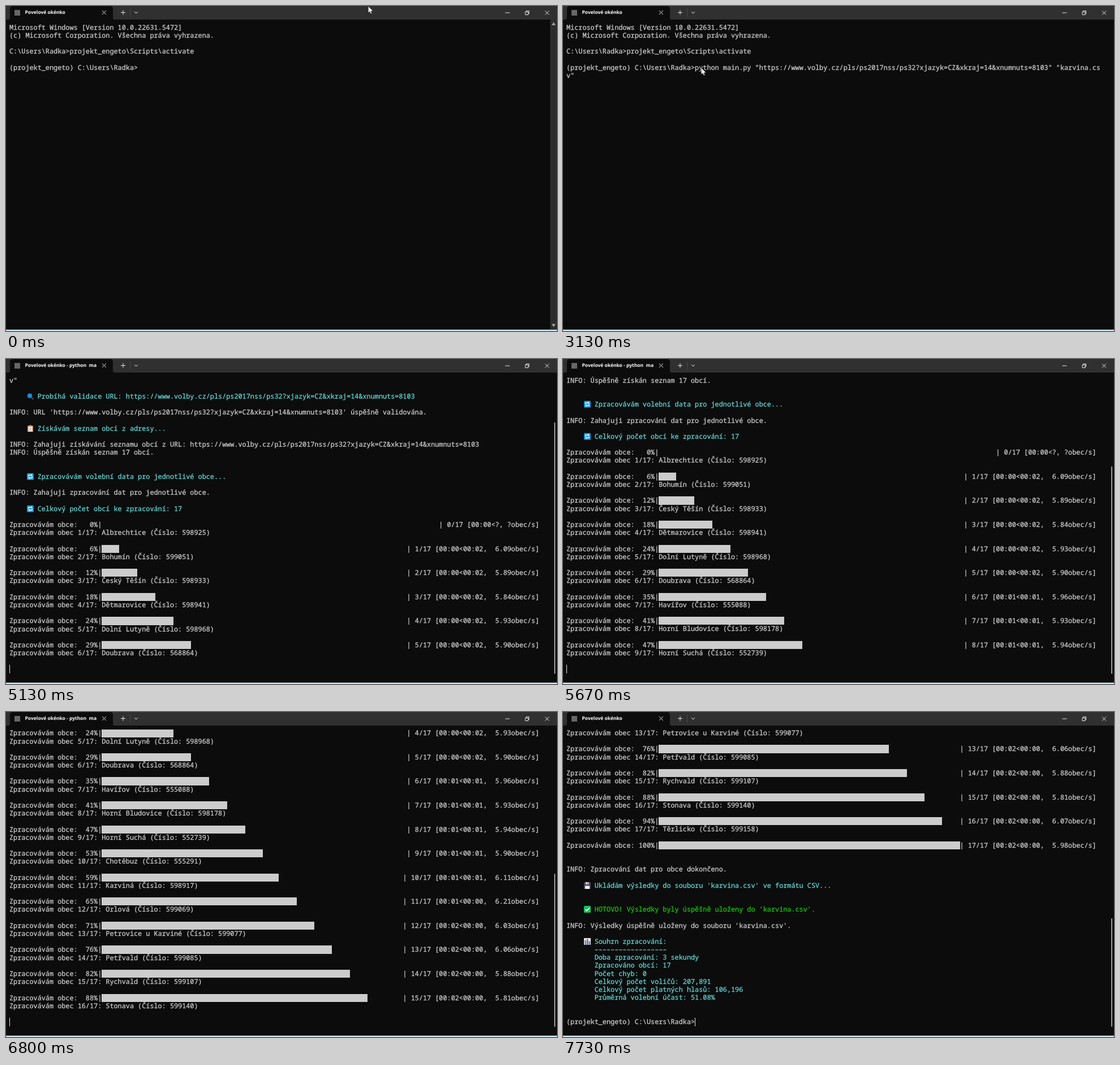
An HTML page that plays this animation: 974 by 575 pixels, repeating every 8000 ms.

```html
<!DOCTYPE html>
<html lang="cs">
<head>
<meta charset="utf-8">
<style>
html, body { margin: 0; width: 100%; height: 100%; overflow: hidden; background: #0c0c0c; }
#stage { position: relative; width: 974px; height: 575px; overflow: hidden; }
#stage > * { position: absolute; }
#chrome { left: 0; top: 0; }
#title { left: 33.5px; top: 4px; width: 126px; overflow: hidden; white-space: pre; color: #fff;
  font: 700 8.5px/16px "Open Sans", sans-serif; text-rendering: geometricPrecision; }
#view { left: 6px; top: 30.8px; width: 950px; height: 525.4px; overflow: hidden; }
#rows { position: absolute; left: 0; width: 100%; color: #ccc; white-space: pre;
  font: 11.8333px/14.2px "Noto Sans Mono", "DejaVu Sans Mono", monospace;
  -webkit-text-stroke: .3px; text-rendering: geometricPrecision; font-variant-ligatures: none; }
.row { position: relative; height: 14.2px; }
.row i { position: absolute; left: 163.3px; top: 0; height: 14.2px; background: #ccc; }
.row svg { position: absolute; left: 30.5px; top: 1px; }
.cyan { color: #61d6d6; }
.green { color: #16c60c; }
#caret { width: 1px; height: 14.2px; background: #e4e4e4; }
#thumb { left: 969px; width: 2px; border-radius: 1px; background: #9a9a9a; }
#mouse { left: 0; top: 0; overflow: visible; }
#edge { left: 0; top: 573px; width: 974px; height: 2px; background: #cde6ee; box-shadow: 0 -1px #56646a; }
</style>
</head>
<body>
<div id="stage">
  <svg id="chrome" width="974" height="575" fill="none" stroke="#e8e8e8">
    <g stroke="none">
      <path fill="#303030" d="M0 0H974V24H0z"/>
      <path fill="#0c0c0c" d="M4 24Q7 24 7 21V5Q7 0 12 0H184Q189 0 189 5V21Q189 24 192 24z"/>
      <path fill="#666" d="M15 7h10v10h-10z"/>
      <path fill="#484848" d="M219 4h1v15h-1z"/>
    </g>
    <path d="M170 8l7 7m0-7l-7 7M203 11.500h8m-4-4v8M227 10l3 3l3-3M882.500 12h8M953 8.500l7 7m0-7l-7 7"/>
    <path d="M918 10.500h5v5h-5zM919.500 10v-1.500h5v5h-1.500"/>
    <g id="bar" stroke="none">
      <path fill="#2c2c2c" d="M962 24h12v548h-12z"/>
      <path fill="#a0a0a0" d="M964.500 34l3.500-5.500l3.500 5.500zM964.500 562.500l3.500 5.500l3.500-5.500z"/>
    </g>
  </svg>
  <div id="title"></div>
  <div id="view"><div id="rows"></div></div>
  <div id="caret"></div>
  <div id="thumb"></div>
  <div id="edge"></div>
  <svg id="mouse" width="10" height="15">
    <path d="M.3.3V12.300L3 9.800L4.900 14L6.900 13.100L5.100 9.100H8.900z" fill="#fff" stroke="#111" stroke-width=".6"/>
  </svg>
</div>
<script>
const $ = id => document.getElementById(id);
const CW = 7.1, LH = 14.2, VIEW = 37, LOOP = 8000;
const url = 'https://www.volby.cz/pls/ps2017nss/ps32?xjazyk=CZ&xkraj=14&xnumnuts=8103';
const prompt = '(projekt_engeto) C:\\Users\\Radka>';

const icons = {
  find: '<path d="M7.500 7.500l4 4" stroke="#3b4a5c" stroke-width="2.500"/><circle cx="5" cy="5" r="4" fill="#1490df" stroke="#2a6ca8"/>',
  list: '<path fill="#c9814a" d="M1 1h10v11H1z"/><path fill="#f4f1ee" d="M2.500 2.500h7v8.500h-7z"/><path fill="#999" d="M4 0h4v2.500H4zM4 5h4v.7H4zM4 7h4v.7H4zM4 9h3v.7H4z"/>',
  sync: '<rect width="12" height="12" rx="1.500" fill="#0f95e6"/><path d="M3 6.500V3.500H8M9 5.500V8.500H4" fill="none" stroke="#fff" stroke-width="1.400"/><path fill="#fff" d="M7 1.500l3 2l-3 2zM5 6.500l-3 2l3 2z"/>',
  disk: '<path fill="#4b4258" d="M0 0h11l1 1v11H0z"/><path fill="#ddd6e6" d="M3 0h6v4H3z"/><path fill="#f3f0f6" d="M2 6.500h8V12H2z"/><path fill="#4b4258" d="M6.500.7h1.500v2.500H6.500z"/>',
  done: '<rect width="12" height="12" rx="1.500" fill="#10c65c"/><path d="M2.500 6l2.500 2.700L9.700 3.500" fill="none" stroke="#fff" stroke-width="1.600"/>',
  chart: '<path fill="#e6e9ee" d="M0 0h12v12H0z"/><path fill="#19a974" d="M1.500 4h2.300v8H1.500z"/><path fill="#e03a4e" d="M4.900 1.500h2.300V12H4.900z"/><path fill="#1b7fd6" d="M8.300 5.500h2.300V12H8.300z"/>'
};

const towns = [['Albrechtice', 598925], ['Bohumín', 599051], ['Český Těšín', 598933], ['Dětmarovice', 598941],
  ['Dolní Lutyně', 598968], ['Doubrava', 568864], ['Havířov', 555088], ['Horní Bludovice', 598178],
  ['Horní Suchá', 552739], ['Chotěbuz', 555291], ['Karviná', 598917], ['Orlová', 599069],
  ['Petrovice u Karviné', 599077], ['Petřvald', 599085], ['Rychvald', 599107], ['Stonava', 599140], ['Těrlicko', 599158]];
const rates = [0, 6.09, 5.89, 5.84, 5.93, 5.90, 5.96, 5.93, 5.94, 5.90, 6.11, 6.21, 6.03, 6.06, 5.88, 5.81, 6.07, 5.98];

function row(text = '', cls = '', icon) {
  const el = document.createElement('div');
  el.className = 'row ' + cls;
  el.textContent = cls ? ' '.repeat(7) + text : text;
  if (icon) el.insertAdjacentHTML('beforeend', `<svg width="12" height="12">${icons[icon]}</svg>`);
  $('rows').append(el);
  return el;
}
const rowsOf = (...texts) => texts.forEach(s => row(s));
const cyan = (text, icon) => row(text, 'cyan', icon);

function progress(n) {
  const clock = `00:0${n < 6 ? 0 : n < 12 ? 1 : 2}<00:0${n < 6 ? 2 : n < 11 ? 1 : 0}`;
  const tail = `| ${n}/17 [` + (n ? `${clock},  ${rates[n].toFixed(2)}` : '00:00<?, ?') + 'obec/s]';
  const cells = 109 - tail.length;
  const pct = String(Math.round(n / 17 * 100)).padStart(3);
  const el = row(`Zpracovávám obce: ${pct}%|${' '.repeat(cells)}${tail}`);
  const fill = document.createElement('i');
  fill.style.width = Math.floor(n / 17 * cells * 8) / 8 * CW + 'px';
  el.append(fill);
  if (n < 17) rowsOf(`Zpracovávám obec ${n + 1}/17: ${towns[n][0]} (Číslo: ${towns[n][1]})`, '');
}

rowsOf('Microsoft Windows [Version 10.0.22631.5472]', '(c) Microsoft Corporation. Všechna práva vyhrazena.', '',
  'C:\\Users\\Radka>projekt_engeto\\Scripts\\activate', '');
const command = document.createElement('span');
command.textContent = `python main.py "${url}" "karvina.cs`;
row(prompt).append(command);
rowsOf('v"', '');
cyan('Probíhá validace URL: ' + url, 'find');
rowsOf('', `INFO: URL '${url}' úspěšně validována.`, '');
cyan('Získávám seznam obcí z adresy...', 'list');
rowsOf('', 'INFO: Zahajuji získávání seznamu obcí z URL: ' + url, 'INFO: Úspěšně získán seznam 17 obcí.', '', '');
cyan('Zpracovávám volební data pro jednotlivé obce...', 'sync');
rowsOf('', 'INFO: Zahajuji zpracování dat pro jednotlivé obce.', '');
cyan('Celkový počet obcí ke zpracování: 17', 'sync');
row();
rates.forEach((_, n) => progress(n));
rowsOf('', '', 'INFO: Zpracování dat pro obce dokončeno.', '');
cyan("Ukládám výsledky do souboru 'karvina.csv' ve formátu CSV...", 'disk');
rowsOf('', '');
row("HOTOVO! Výsledky byly úspěšně uloženy do 'karvina.csv'.", 'green', 'done');
rowsOf('', "INFO: Výsledky úspěšně uloženy do souboru 'karvina.csv'.", '');
cyan('Souhrn zpracování:', 'chart');
['–'.repeat(18), 'Doba zpracování: 3 sekundy', 'Zpracováno obcí: 17', 'Počet chyb: 0', 'Celkový počet voličů: 207,891',
  'Celkový počet platných hlasů: 106,196', 'Průměrná volební účast: 51.08%'].forEach(s => cyan(s));
rowsOf('', '', prompt);
const rows = [...$('rows').children];

// Output steps: time, rows shown, caret row, caret column
const ticks = [4270, 4400, 4600, 4800, 4930, 5070, 5270, 5470, 5600, 5800, 5930, 6070, 6270, 6400, 6600, 6800, 6930];
const steps = [[0, 6, 5, 32], [2400, 7, 6, 2], [3270, 7], [3930, 10], [4000, 11], [4070, 14], [4130, 15],
  ...ticks.map((t, n) => [t, 27 + 3 * n]), [7130, 96], [7270, 98, 97, 32]];
const blinks = [1000, 1530, 1930, 2400, 2530, 3130, 3270, 7270, 7730];

const stepAt = t => {
  const [, shown, line = shown, col = 0] = steps.findLast(s => s[0] <= t) || steps[0];
  return { shown, line, col };
};
const ease = (t, a, b) => {
  const k = Math.min(1, Math.max(0, (t - a) / (b - a)));
  return k * k * (3 - 2 * k);
};
const show = (el, on) => el.style.visibility = on ? 'visible' : 'hidden';

function draw(t) {
  const { shown, line, col } = stepAt(t);
  const top = Math.max(0, line + 1 - VIEW);
  rows.forEach((el, i) => show(el, i < shown));
  command.style.display = t < 2400 ? 'none' : '';
  $('rows').style.top = -top * LH + 'px';

  $('caret').style.left = 6 + col * CW + 'px';
  $('caret').style.top = 30.2 + (line - top) * LH + 'px';
  show($('caret'), blinks.filter(b => b <= t).length % 2);

  // The scroll thumb follows the output slightly late
  const total = stepAt(t < 7130 ? t - 60 : t).line + 1;
  const size = 19387 / total - 5.85;
  show($('thumb'), total > VIEW);
  $('thumb').style.top = 557 - size + 'px';
  $('thumb').style.height = size + 'px';

  const move = ease(t, 70, 670), settle = ease(t, 1000, 1130);
  const x = 640 - 399 * move + 3 * settle, y = 107 * move + 2 * settle;
  $('mouse').style.transform = `translate(${x}px, ${y}px)`;
  show($('mouse'), t < 3270);
  show($('bar'), t < 500);
  $('title').textContent = 'Povelové okénko' + (t >= 3330 && t < 7270 ? ' - python  ma' : '');
}

function loop() {
  draw(performance.now() % LOOP);
  requestAnimationFrame(loop);
}
loop();
</script>
</body>
</html>
```
